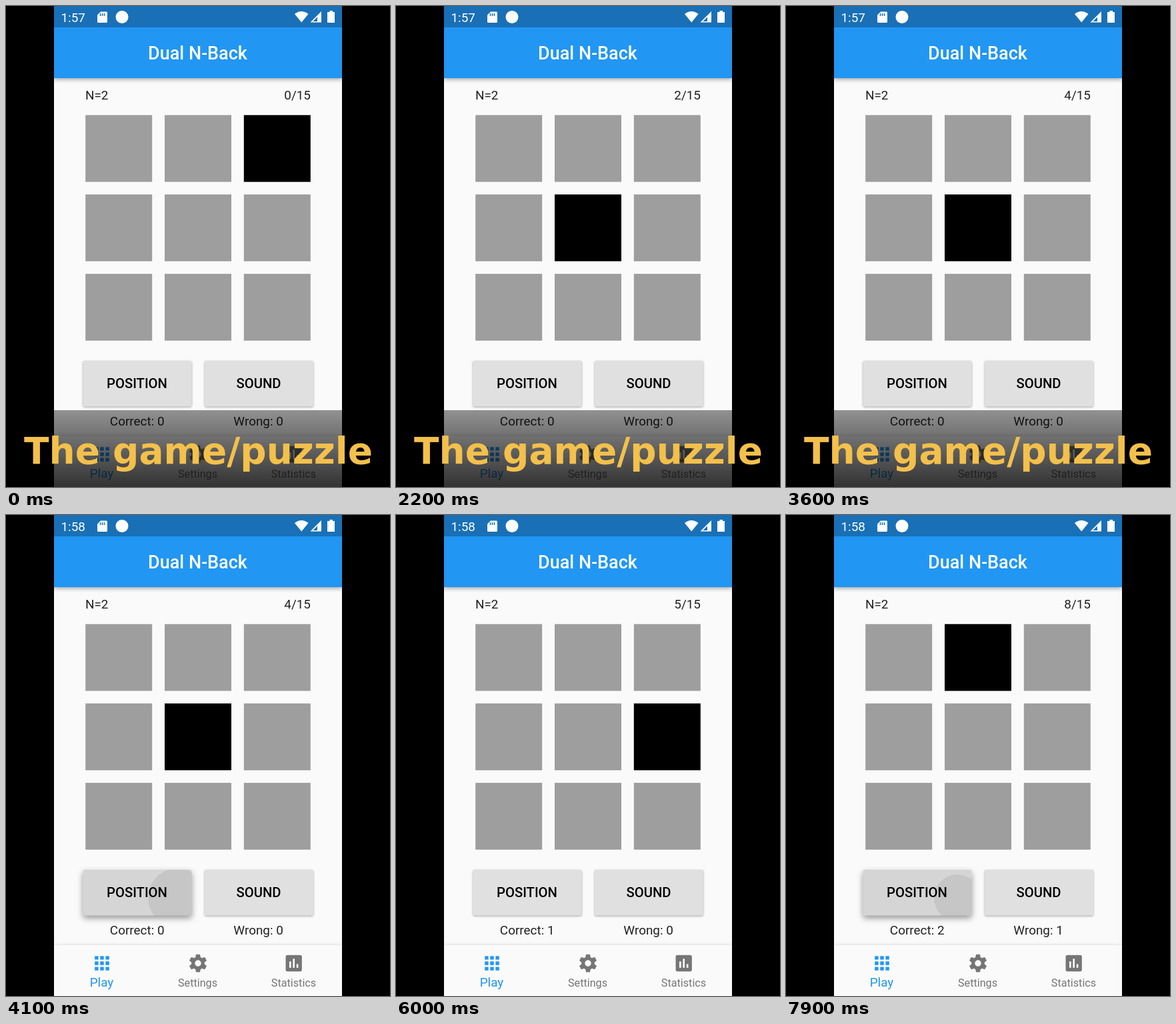
These frames come from a looping animation (576 by 720 pixels, 8000 ms). An HTML page:

```html
<!DOCTYPE html>
<html lang="en">
<head>
<meta charset="utf-8">
<title>Memory grid</title>
<style>
html, body { margin: 0; width: 100%; height: 100%; overflow: hidden; background: #000; }
svg { display: block; }
text { font: 18.9px Roboto, sans-serif; fill: #222; }
.mid { text-anchor: middle; }
.end { text-anchor: end; }
.title { font-size: 27px; font-weight: 500; fill: #fff; }
.label { font-size: 20.25px; font-weight: 500; fill: #000; }
.small { font-size: 16.2px; fill: #757575; }
.clock { fill: #fff; }
.caption { font: bold 55px "DejaVu Sans", sans-serif; fill: #f3c04b; }
.bar { filter: drop-shadow(0 2px 3px rgba(0, 0, 0, .35)); }
.button { fill: #e0e0e0; filter: drop-shadow(0 1.5px 1.5px rgba(0, 0, 0, .35)); }
.button.down { filter: drop-shadow(0 4px 5px rgba(0, 0, 0, .4)); }
.nav { filter: drop-shadow(0 -1px 2px rgba(0, 0, 0, .1)); }
</style>
</head>
<body>
<svg width="576" height="720" viewBox="0 0 576 720">
  <defs>
    <linearGradient id="shade" x2="0" y2="1">
      <stop stop-opacity=".42"/>
      <stop offset="1" stop-opacity=".8"/>
    </linearGradient>
    <clipPath id="screen"><path d="M72 0h432v720H72z"/></clipPath>
    <clipPath id="face"><rect x="115.5" y="531" width="163" height="68.5" rx="2.7"/></clipPath>
  </defs>
  <path d="M0 0h576v720H0z"/>
  <g clip-path="url(#screen)">
    <path fill="#fafafa" d="M72 0h432v720H72z"/>
    <path class="bar" fill="#2196f3" d="M72 0h432v108H72z"/>
    <path fill="#1970b6" d="M72 0h432v32H72z"/>
    <text class="title mid" x="287.5" y="80">Dual N-Back</text>

    <text class="clock" id="clock" x="82.5" y="23.5"></text>
    <g fill="#fff">
      <path d="M142 8.500h8.500q1.500 0 1.500 1.500v13.500q0 1.500-1.500 1.500h-12q-1.500 0-1.500-1.500v-10z"/>
      <circle cx="174" cy="16.500" r="9.500"/>
      <path d="M433 12q10-8 20.500 0l-10.250 12.500z"/>
      <path d="M473 8v16.500h-16.500z"/>
      <path d="M485.500 7h4.500v2h3v16h-11v-16h3.500z"/>
    </g>
    <path d="M141.500 11v4m3-4v4m3-4v4" stroke="#1970b6" stroke-width="1.500"/>
    <path d="M467 16.500v6.500h-6.500z" fill="#1970b6"/>

    <text x="119" y="139.500">N=2</text>
    <text class="end" id="count" x="457" y="139.500"></text>
    <g id="cells"></g>

    <rect class="button" id="position" x="115.500" y="531" width="163" height="68.500" rx="2.700"/>
    <g clip-path="url(#face)">
      <rect id="glow" x="115" y="531" width="164" height="69"/>
      <circle id="ripple" cx="257" cy="573"/>
    </g>
    <rect class="button" x="298" y="531" width="163" height="68.500" rx="2.700"/>
    <text class="label mid" x="196.500" y="572">POSITION</text>
    <text class="label mid" x="379" y="572">SOUND</text>
    <text class="mid" id="correct" x="196.700" y="627.500"></text>
    <text class="mid" id="wrong" x="378.600" y="627.500"></text>

    <path class="nav" fill="#fafafa" d="M72 644h432v76H72z"/>
    <path id="apps" fill="#2196f3" transform="translate(144 671) scale(1.350)"/>
    <g id="gear" fill="#757575" transform="translate(288 671) scale(1.350)">
      <circle r="5.400" fill="none" stroke="#757575" stroke-width="3.800"/>
    </g>
    <g transform="translate(431.700 671) scale(1.350)">
      <rect x="-9" y="-9" width="18" height="18" rx="2" fill="#757575"/>
      <path d="M-4 5v-7M0 5V-5M4 5V1" stroke="#fafafa" stroke-width="2"/>
    </g>
    <text class="mid" x="143.500" y="706" style="fill:#2196f3">Play</text>
    <text class="small mid" x="287.500" y="706">Settings</text>
    <text class="small mid" x="431.500" y="706">Statistics</text>
  </g>
  <g id="overlay">
    <path fill="url(#shade)" d="M0 605h576v115H0z"/>
    <text class="caption mid" x="288.500" y="685">The game/puzzle</text>
  </g>
</svg>
<script>
const LOOP = 8000, STEP = 100;
const CAPTION_END = 4100;
// Each round: start time in ms, lit cell
const rounds = [[0, 2], [1400, 6], [2100, 4], [2800, 8], [3500, 4],
                [4300, 5], [6100, 1], [7200, 3], [7800, 1]];
const presses = [3900, 7750];

const $ = id => document.getElementById(id);
const grid = [...Array(9).keys()];

function add(parent, name, attrs) {
  const node = document.createElementNS("http://www.w3.org/2000/svg", name);
  for (const key in attrs) node.setAttribute(key, attrs[key]);
  return parent.appendChild(node);
}

const cells = grid.map(i => add($("cells"), "rect", {
  x: 119.2 + i % 3 * 118.8, y: 163.3 + Math.floor(i / 3) * 118.8, width: 100, height: 100
}));
$("apps").setAttribute("d", grid.map(i =>
  `M${i % 3 * 6 - 8} ${Math.floor(i / 3) * 6 - 8}h4v4h-4z`).join(""));
for (let angle = 0; angle < 360; angle += 60)
  add($("gear"), "path", { d: "M-2.900-6L-2.200-9.900H2.200L2.900-6z", transform: `rotate(${angle})` });

function drawPress(t) {
  const start = presses.find(p => t >= p && t < p + 600);
  const age = start === undefined ? 0 : t - start;
  const fade = age ? Math.min(1, (600 - age) / 300) : 0;
  $("position").classList.toggle("down", age > 0 && age < 400);
  $("glow").setAttribute("opacity", 0.05 * fade);
  $("ripple").setAttribute("opacity", 0.07 * fade);
  $("ripple").setAttribute("r", 8 + age * 0.18);
}

function draw(t) {
  const index = rounds.findLastIndex(([start]) => t >= start);
  const captioned = t < CAPTION_END;
  cells.forEach((cell, i) => cell.setAttribute("fill", i === rounds[index][1] ? "#000" : "#9e9e9e"));
  $("count").textContent = `${index}/15`;
  $("clock").textContent = captioned ? "1:57" : "1:58";
  $("correct").textContent = `Correct: ${index < 5 ? 0 : index < 6 ? 1 : 2}`;
  $("wrong").textContent = `Wrong: ${index < 7 ? 0 : 1}`;
  $("overlay").style.display = captioned ? "" : "none";
  drawPress(t);
}

function tick() {
  draw(Math.floor(performance.now() % LOOP / STEP) * STEP);
  requestAnimationFrame(tick);
}
tick();
</script>
</body>
</html>
```
